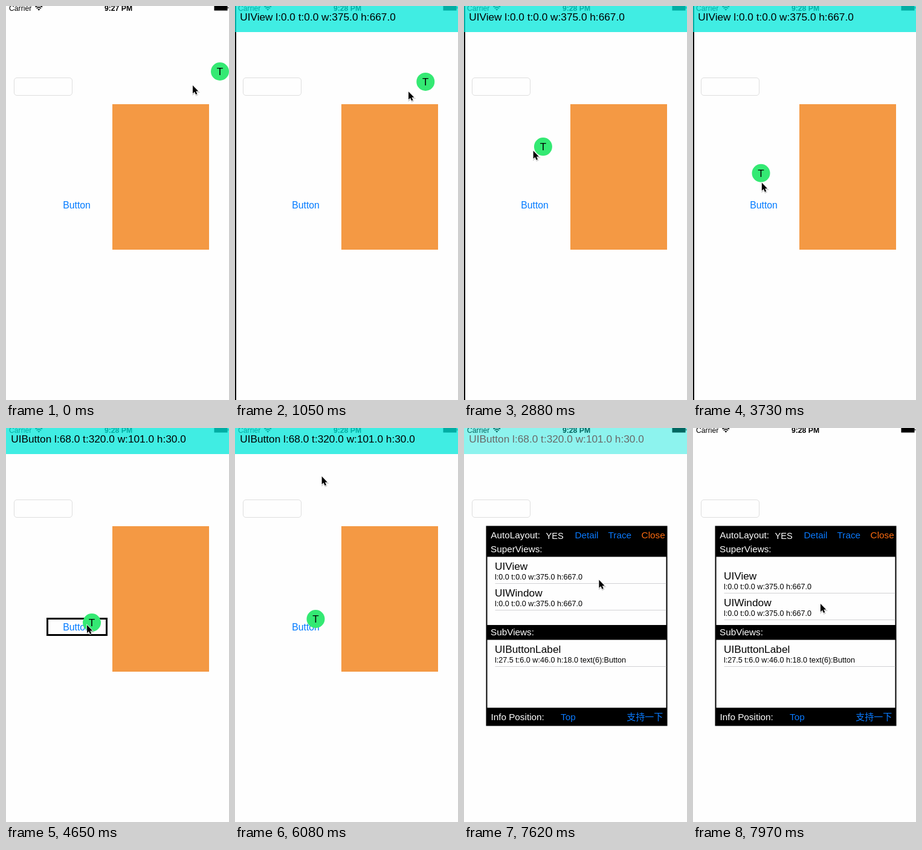
Write an HTML page that moves like this. It is 369 by 650 pixels and loops after 8000 ms.

```html
<!DOCTYPE html>
<html lang="en">
<head>
<meta charset="utf-8">
<title>View inspector</title>
<style>
  html, body { margin: 0; width: 100%; height: 100%; overflow: hidden; background: #fefefe; }
  svg { display: block; width: 369px; height: 650px; }
  text { font-family: "Liberation Sans", Arial, sans-serif; white-space: pre; }
  .status { font-size: 12.2px; }
  .head { font-size: 15.3px; fill: #fff; }
  .link { font-size: 15.3px; fill: #0a7aff; }
  .row { font-size: 17.25px; }
  .sub { font-size: 12.6px; }
  .cjk { font-family: "Noto Sans CJK SC", "Noto Sans CJK", sans-serif; font-size: 15px; }
</style>
</head>
<body>
<svg viewBox="0 0 369 650">
  <defs>
    <clipPath id="listClip"><rect x="38.5" y="212.5" width="296" height="112.5"/></clipPath>
    <path id="arrow" d="M0 0V13.2L3 10.5 5.1 15.1 7.3 14.1 5.3 9.6H9.3Z"/>
  </defs>
  <rect width="369" height="650" fill="#fefefe"/>

  <g class="status">
    <text x="5" y="7.6">Carrier</text>
    <g fill="none" stroke="#000" stroke-width="1.7">
      <path d="M48.6 1.6Q54.3 -3 60 1.6M50.6 3.8Q54.3 0.8 58 3.8"/>
      <path d="M54.3 7.6L52.2 5.6Q54.3 4 56.4 5.6Z" fill="#000" stroke="none"/>
    </g>
    <text id="clock" x="186" y="7.6" text-anchor="middle" font-weight="bold"></text>
    <path d="M344.5 -2H366.5V7.6H344.5ZM367 1Q369.4 2.8 367 4.8Z"/>
  </g>

  <rect x="13.5" y="118.5" width="96" height="29" rx="4.5" fill="#fefefe" stroke="#dedede"/>
  <rect x="176" y="162" width="160" height="240" fill="#f49944"/>
  <text x="94.2" y="333.8" font-size="15.8" fill="#007aff">Button</text>
  <rect id="outline" fill="none" stroke="#000" stroke-width="3"/>

  <g id="bar">
    <rect width="369" height="43" fill="rgb(0,231,218)" fill-opacity=".75"/>
    <text id="info" class="row" x="8.2" y="24"></text>
  </g>

  <g id="ball">
    <circle r="15" fill="#34e973"/>
    <text y="6.1" font-size="17" text-anchor="middle">T</text>
  </g>

  <g id="panel">
    <rect x="36.5" y="161.5" width="300" height="330"/>
    <rect x="38.5" y="212.5" width="296" height="112.5" fill="#fefefe"/>
    <rect x="38.5" y="349.5" width="296" height="112" fill="#fefefe"/>
    <text class="head" x="44.3" y="182">AutoLayout:</text>
    <text class="head" x="135.6" y="182.6" style="font-size:14.6px">YES</text>
    <text class="link" x="183.4" y="182">Detail</text>
    <text class="link" x="238.6" y="182">Trace</text>
    <text class="link" x="293.6" y="182" style="fill:#ff6c10">Close</text>
    <text class="head" x="44" y="204.6">SuperViews:</text>
    <text class="head" x="44" y="342">SubViews:</text>
    <text class="head" x="44.4" y="482">Info Position:</text>
    <text class="link" x="160" y="482">Top</text>
    <text class="link cjk" x="269.3" y="482.4">支持一下</text>
    <g clip-path="url(#listClip)"><g id="supers"></g></g>
    <g id="subs"></g>
  </g>

  <g id="cursor">
    <use href="#arrow" x=".5" y="1.3" opacity=".2" stroke="#000" stroke-width="2"/>
    <use href="#arrow" stroke="#fff" stroke-width="1.4" paint-order="stroke"/>
  </g>
</svg>
<script>
const LOOP = 8000;
const GRAB = 850, DRAG_LAG = 100, SELECT = 900, RELEASE = 5800, PANEL_OPEN = 6630, SCROLL = 7440;

const clamp = (v, lo = 0, hi = 1) => Math.max(lo, Math.min(hi, v));
const smooth = u => u * u * (3 - 2 * u);
const fling = u => 1 - (1 - u) ** 3;
const settle = u => Math.sin(u * Math.PI / 2);

// Pointer gestures; it rests between them
const rest = { x: 309, y: 131 };
const gestures = [
  { from: 60, to: 670, x: 354, y: 112, ease: smooth },
  { from: GRAB, to: 1600, x: 244, y: 160, ease: fling },
  { from: 1600, to: 2060, x: 226, y: 262, ease: smooth },
  { from: 2060, to: 2460, x: 178, y: 228, ease: settle },
  { from: 2460, to: 2980, x: 108, y: 240, ease: smooth },
  { from: 3520, to: 3820, x: 114, y: 293, ease: fling },
  { from: 3820, to: 4140, x: 192, y: 325, ease: smooth },
  { from: 4440, to: 4670, x: 134, y: 325, ease: fling },
  { from: 5060, to: 5170, x: 133.5, y: 319, ease: smooth },
  { from: RELEASE, to: 6460, x: 146, y: 24, ease: fling },
  { from: 6900, to: 7240, x: 228, y: 236, ease: smooth },
  { from: SCROLL, to: 7970, x: 211, y: 290, ease: smooth }
];

function pointer(t) {
  let { x, y } = rest;
  for (const g of gestures) {
    const k = g.ease(clamp((t - g.from) / (g.to - g.from)));
    x += (g.x - x) * k;
    y += (g.y - y) * k;
  }
  return { x, y };
}

// l and t are relative to the parent view
const root = { name: 'UIView', l: 0, t: 0, w: 375, h: 667 };
const box = { name: 'UIView', l: 177, t: 169, w: 160, h: 240 };
const button = { name: 'UIButton', l: 68, t: 320, w: 101, h: 30 };
const label = { name: 'UIButtonLabel', l: 27.5, t: 6, w: 46, h: 18, parent: button };

// The screen is cropped by 1 px on the left and 7 px at the top
const origin = ({ l, t, parent }) => {
  const o = parent ? origin(parent) : { x: -1, y: -7 };
  return { x: o.x + l, y: o.y + t };
};

const viewAt = (x, y) => [label, button, box, root].find(view => {
  const o = origin(view);
  return x >= o.x && x < o.x + view.w && y >= o.y && y < o.y + view.h;
});

const frameText = view =>
  ['l', 't', 'w', 'h'].map(key => `${key}:${view[key].toFixed(1)}`).join(' ');

const row = (y, name, detail) => `
  <text class="row" x="51" y="${y}">${name}</text>
  <text class="sub" x="51" y="${y + 16}">${detail}</text>
  <path d="M51.5 ${y + 22.5}H334.5" stroke="#d2d2d4"/>`;

const $ = id => document.getElementById(id);
$('supers').innerHTML = row(234, 'UIView', frameText(root)) + row(278, 'UIWindow', frameText(root));
$('subs').innerHTML = row(371, label.name, frameText(label) + ' text(6):Button');

const show = (id, on) => $(id).setAttribute('display', on ? 'inline' : 'none');
const move = (id, x, y) => $(id).setAttribute('transform', `translate(${x.toFixed(2)} ${y.toFixed(2)})`);

function select(view) {
  const { x, y } = origin(view);
  const inner = { x: x + 1.5, y: y + 1.5, width: view.w - 3, height: view.h - 3 };
  for (const key in inner) $('outline').setAttribute(key, inner[key]);
  $('info').textContent = `${view.name} ${frameText(view)}`;
}

function render(t) {
  const cursor = pointer(t);
  move('cursor', cursor.x, cursor.y);

  const held = pointer(clamp(t - DRAG_LAG, GRAB, RELEASE));
  const ball = { x: held.x, y: held.y - 4 };
  move('ball', ball.x, ball.y);
  select(viewAt(ball.x, ball.y));

  const selecting = t >= SELECT;
  show('outline', selecting && t < RELEASE);
  show('bar', selecting);
  $('bar').setAttribute('opacity', 1 - smooth(clamp((t - 7480) / 320)));
  $('clock').textContent = selecting ? '9:28 PM' : '9:27 PM';

  show('panel', t >= PANEL_OPEN);
  show('ball', t < PANEL_OPEN);
  // Rubber-band pull past the top of the list
  move('supers', 0, t > SCROLL ? Math.max(0, cursor.y - 256) * 0.47 : 0);
}

const start = performance.now();
function tick() {
  render((performance.now() - start) % LOOP);
  requestAnimationFrame(tick);
}
tick();
</script>
</body>
</html>
```
